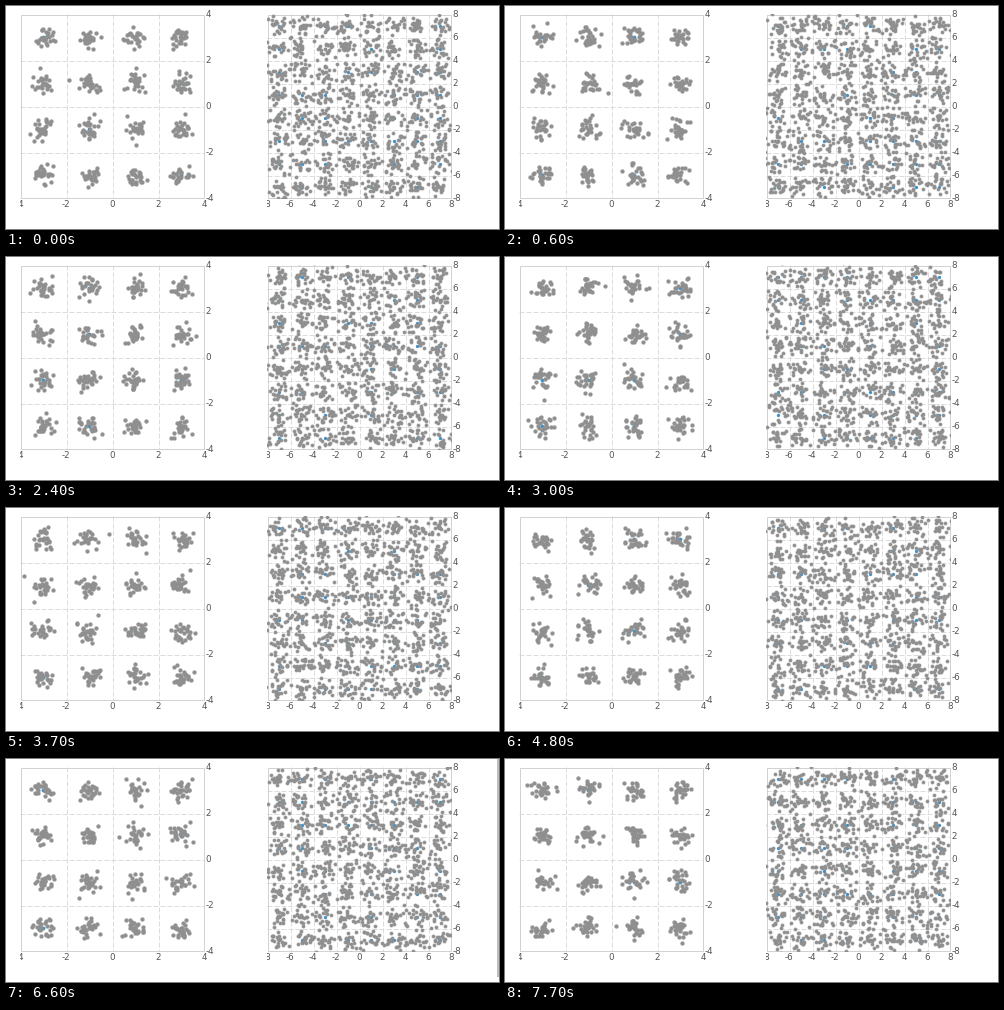
A matplotlib script that plays this animation: 493 px wide and 223 px high, repeating every 8000 ms.

```python
import numpy as np
import matplotlib.pyplot as plt
from matplotlib.animation import FuncAnimation
from matplotlib.patches import Rectangle

W, H, DPI = 493, 223, 64
STEP, FRAMES = 100, 80
PT = 72 / DPI  # points per pixel
TOP, SIDE = 8, 184
GRAY, BLUE = "#8f8f8f", "#3a92cc"

# Ticks (100 ms each) on which a fresh batch of symbols arrives.
UPDATES = [0, 1, 2, 3, 5, 6, 8, 9, 10, 12, 13, 14, 16, 17, 18, 20, 21, 22,
           24, 25, 26, 28, 30, 31, 33, 34, 37, 39, 41, 42, 45, 46, 48, 51,
           53, 54, 58, 61, 66, 68, 72, 77]

plt.rcParams["font.family"] = "DejaVu Sans"
fig = plt.figure(figsize=(W / DPI, H / DPI), dpi=DPI, facecolor="white")
ax = fig.add_axes([0, 0, 1, 1])
ax.set(xlim=(0, W), ylim=(H, 0))
ax.axis("off")


class Constellation:
    def __init__(self, left, limit, tick, per_symbol, sigma, size):
        self.left, self.limit, self.sigma = left, limit, sigma
        self.scale = SIDE / (2 * limit)
        self.draw_axes(tick)

        levels = np.arange(-limit + 1, limit, 2)
        grid = np.array(np.meshgrid(levels, levels)).reshape(2, -1)
        self.symbols = np.repeat(grid, per_symbol, axis=1)
        style = dict(ls="none", marker="o", snap=False)
        ideal, = ax.plot(*self.to_px(*grid), color=BLUE, mew=0,
                         ms=size * PT, zorder=3, **style)
        # A translucent rim gives the dots their soft edge.
        self.dots, = ax.plot([], [], mfc=GRAY, mec=(0.56, 0.56, 0.56, 0.4),
                             mew=PT, ms=size * PT, zorder=4, **style)
        clip = Rectangle((left, TOP), SIDE, SIDE, transform=ax.transData)
        for artist in (ideal, self.dots):
            artist.set_clip_path(clip)

    def to_px(self, x, y):
        return (self.left + (x + self.limit) * self.scale,
                TOP + (self.limit - y) * self.scale)

    def draw_axes(self, tick):
        x0, x1, y0, y1 = self.left, self.left + SIDE, TOP, TOP + SIDE
        text = dict(color="#555555", size=8.7 * PT, va="baseline", zorder=6)
        grid = dict(color="#dcdcdc", lw=PT, dashes=(5, 2), zorder=1)
        for v in range(-self.limit, self.limit + 1, tick):
            px, py = self.to_px(v, v)
            if abs(v) < self.limit:
                ax.plot([px + 0.5] * 2, [y0, y1], **grid)
                ax.plot([x0, x1], [py + 0.5] * 2, **grid)
            ax.text(px, y1 + 9, str(v), ha="center", **text)
            ax.text(x1 + 1.5, py + 3, str(v), ha="left", **text)
        ax.add_patch(Rectangle((x0 + 0.5, y0 + 0.5), SIDE - 1, SIDE - 1,
                               fill=False, ec="#d2d2d2", lw=PT, zorder=2))
        # The first x label is cut off at the plot's left edge.
        ax.add_patch(Rectangle((x0 - 14, y1 + 1), 14, 14, fc="white",
                               lw=0, zorder=7))

    def update(self, rng):
        noise = rng.normal(0, self.sigma, self.symbols.shape)
        self.dots.set_data(*self.to_px(*(self.symbols + noise)))


plots = [Constellation(14, 4, 2, 27, 0.225, 3.8),
         Constellation(261, 8, 2, 22, 0.48, 3.3)]
scrollbar = ax.add_patch(Rectangle((491, 0), 2, 218, fc="#bdbdbd", lw=0))


def draw(i):
    batch = max(t for t in UPDATES if t <= i)
    rng = np.random.default_rng(1000 + batch)
    for plot in plots:
        plot.update(rng)
    scrollbar.set_visible(58 <= i < 77)
    scrollbar.set_alpha(1 if i < 72 else 0.5)
    return [plot.dots for plot in plots] + [scrollbar]


anim = FuncAnimation(fig, draw, frames=FRAMES, interval=STEP,
                     repeat=True, repeat_delay=0, blit=False)
plt.show()
```
